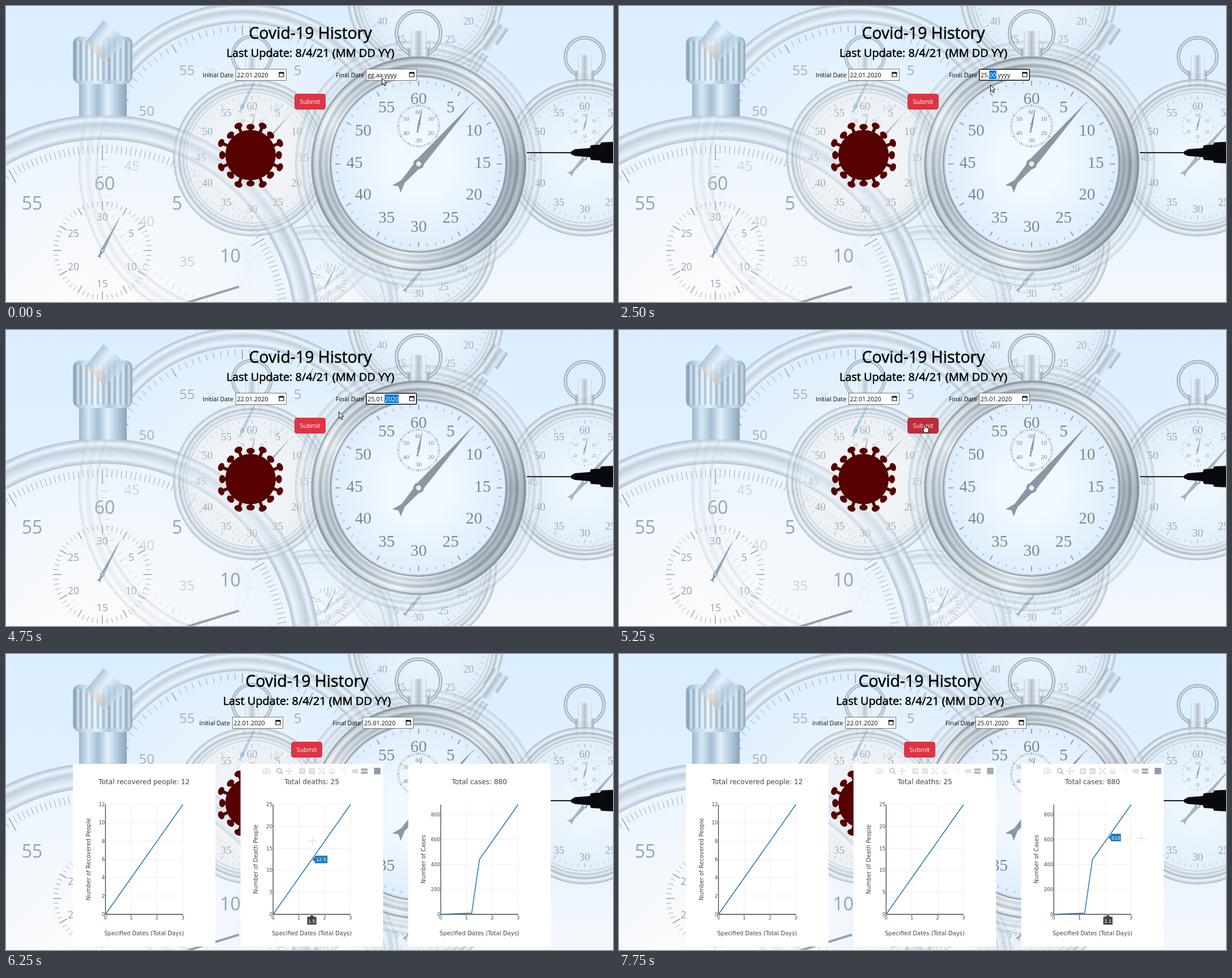
Recreate the animation shown at these times as an HTML page with a canvas. Size 1071x523 px, loop 8000 ms.

```html
<!DOCTYPE html>
<html lang="en">
<head>
<meta charset="utf-8">
<title>Covid-19 History</title>
<style>
html, body { margin: 0; width: 100%; height: 100%; overflow: hidden; }
body { position: relative; background: #e3f1fe; color: #0c0d10; font: 10.8px/16px "Open Sans", "Noto Sans", sans-serif; }
canvas, svg { position: absolute; left: 0; top: 0; }
#head { position: absolute; inset: 0; }
#head > * { position: absolute; margin: 0; white-space: nowrap; }
h1, h2 { left: 0; width: 1074px; text-align: center; font-weight: 400; color: #000; -webkit-text-stroke: .55px #000; }
h1 { top: 27px; font-size: 28.4px; line-height: 40px; }
h2 { top: 70px; font-size: 19.9px; line-height: 26px; }
.field { box-sizing: border-box; top: 111px; width: 90px; height: 21px; padding: 2px 0 0 2px; border: 1px solid #767676; background: #fff; line-height: 15px; }
.field span { display: inline-block; height: 15px; }
.field .on { background: #0078d7; color: #fff; }
.field.focus { border-color: #101010; border-radius: 2px; box-shadow: inset 0 0 0 .5px #101010; }
.field svg { left: 75px; top: 4px; }
#submit { left: 509px; top: 154.5px; width: 55px; height: 28px; border-radius: 4.5px; background: #dc3545; color: #fff; text-align: center; line-height: 28px; }
#submit.hover { background: #bb2d3b; }
.chart text { font-family: "DejaVu Sans", Verdana, sans-serif; fill: #444; }
.chart .tip text { font: 9.3px "Liberation Sans", Arial, sans-serif; fill: #fff; }
</style>
</head>
<body>
<canvas id="back" width="1071" height="523"></canvas>
<div id="head">
  <h1>Covid-19 History</h1>
  <h2>Last Update: 8/4/21 (MM DD YY)</h2>
  <span style="left:347px;top:114px">Initial Date</span>
  <div class="field" style="left:404.5px"><span>22</span>.<span>01</span>.<span>2020</span></div>
  <span style="left:582px;top:114px">Final Date</span>
  <div class="field" id="final" style="left:635px"><span></span>.<span></span>.<span></span></div>
  <div id="submit">Submit</div>
</div>
<svg id="charts" width="1071" height="523"></svg>
<svg width="1071" height="523">
  <g class="pointer" id="arrow"><path d="M.5 .5V12l2.6-2.4 2 4.6 2-.9-2-4.5h3.6z" fill="#fff" stroke="#000"/></g>
  <g class="pointer" id="hand"><path d="M3.2 1.3q1.3-1.4 2.3.2V6l4.6 1q1.6.4 1.5 2.2l-.8 4-1.2 2.4H4.3L.8 10.3q-.2-1.6 1.2-1.3l1.2 1z" fill="#fff" stroke="#000"/></g>
  <g class="pointer" id="cross"><path d="M-8 .5H9M.5-8V9" stroke="#d5dbe2"/></g>
</svg>
<script>
const $ = id => document.getElementById(id);
const g = $('back').getContext('2d');
const TAU = Math.PI * 2;

// ---- background ----
const alpha = (a, draw) => { g.save(); g.globalAlpha = a; draw(); g.restore(); };

function shade(grad, colors) {
  colors.forEach((c, i) => grad.addColorStop(i / (colors.length - 1), c));
  return grad;
}
const linear = (x0, y0, x1, y1, colors) => shade(g.createLinearGradient(x0, y0, x1, y1), colors);

function disc(x, y, r, inner, outer) {
  g.fillStyle = shade(g.createRadialGradient(x, y, r * .35, x, y, r), [inner, outer]);
  g.beginPath(); g.arc(x, y, r, 0, TAU); g.fill();
}

function annulus(x, y, r0, r1, fill) {
  g.fillStyle = fill;
  g.beginPath(); g.arc(x, y, r1, 0, TAU); g.arc(x, y, r0, 0, TAU, true); g.fill();
}

const band = (x, y, r0, r1, colors) =>
  annulus(x, y, r0, r1, shade(g.createRadialGradient(x, y, r0, x, y, r1), colors));

// light and dark patches around a polished rim
const gloss = (x, y, r0, r1) => annulus(x, y, r0, r1, shade(g.createConicGradient(0, x, y),
  ['#5d6d7b66', '#5d6d7b55', '#ffffff55', '#5d6d7b33', '#ffffff66', '#5d6d7b33', '#ffffff44', '#5d6d7b66']));

function circle(x, y, r, color, width) {
  g.strokeStyle = color; g.lineWidth = width;
  g.beginPath(); g.arc(x, y, r, 0, TAU); g.stroke();
}

function ticks(x, y, r0, r1, n, color, width = 1, every = 5, extra = 0) {
  g.strokeStyle = color;
  for (let i = 0; i < n; i++) {
    const a = i / n * TAU, s = Math.sin(a), c = -Math.cos(a), main = i % every === 0;
    const from = r0 - (main ? extra : 0);
    g.lineWidth = main ? width * 1.7 : width;
    g.beginPath(); g.moveTo(x + from * s, y + from * c); g.lineTo(x + r1 * s, y + r1 * c); g.stroke();
  }
}

function numbers(x, y, r, font, color, count = 12, step = 5, skip = []) {
  g.font = font; g.fillStyle = color; g.textAlign = 'center'; g.textBaseline = 'middle';
  for (let i = 0; i < count; i++) {
    const a = i / count * TAU, label = (i || count) * step;
    if (!skip.includes(label)) g.fillText(label, x + r * Math.sin(a), y - r * Math.cos(a) + 1);
  }
}

function needle(x, y, angle, tip, tail, width, color) {
  g.save();
  g.translate(x, y); g.rotate(angle);
  g.fillStyle = color;
  g.beginPath();
  g.moveTo(0, -tip);
  g.lineTo(width, -width); g.lineTo(width * .5, tail * .7); g.lineTo(width * 1.3, tail);
  g.lineTo(0, tail * .9);
  g.lineTo(-width * 1.3, tail); g.lineTo(-width * .5, tail * .7); g.lineTo(-width, -width);
  g.fill();
  g.beginPath(); g.arc(0, 0, width * 1.25, 0, TAU); g.fill();
  g.fillStyle = '#e6eef6';
  g.beginPath(); g.arc(0, 0, width * .6, 0, TAU); g.fill();
  g.restore();
}

const CHROME = ['#9dacb8', '#eef4f9', '#b4c1cc', '#e3ebf2', '#99a8b4', '#f2f7fb', '#cdd8e1', '#93a2af'];
const SOFT = ['#aebfce', '#eaf3fb', '#d5e3f0', '#bccddc', '#edf5fc', '#a9bccd'];

function loop(x, y, r) {
  circle(x, y, r, '#8496a5', 6);
  circle(x, y, r, '#e2edf6', 3);
  g.fillStyle = linear(x - r * .5, 0, x + r * .5, 0, ['#8496a5', '#eef5fb', '#a9b9c7', '#f4f9fd', '#8496a5']);
  g.fillRect(x - r * .48, y + r * .7, r * .96, r * .85);
  g.fillRect(x - r * .35, y - r * .1, r * .7, r * .8);
}

function pocket(x, y, face, edge) {
  band(x, y, 114, 139, CHROME);
  disc(x, y, 115, face, edge);
  ticks(x, y, 104, 109, 60, '#a0adb9', .8, 5, 2);
  numbers(x, y, 91, '19px "Liberation Serif", serif', '#85919c');
  ticks(x, y - 56, 26, 29, 30, '#909eaa', .7);
  numbers(x, y - 56, 19, '8px "Liberation Serif", serif', '#808d99', 6, 10);
  needle(x, y - 56, .25, 24, 8, 1.4, '#808e9b');
  needle(x, y, .72, 104, 42, 4, '#98a5b0');
}

function pusher(x, y, angle, w, h) {
  g.save();
  g.translate(x, y); g.rotate(angle);
  g.fillStyle = linear(-w / 2, 0, w / 2, 0, ['#8fa0af', '#eaf3fa', '#a3b4c2', '#dde9f3', '#8798a7']);
  g.fillRect(-w / 2, -h / 2, w, h);
  g.fillRect(-w * .3, h / 2, w * .6, h * .6);
  g.restore();
}

function crown() {
  g.fillStyle = linear(129, 0, 213, 0, ['#9db6ca', '#d5e8f6', '#a5bfd3', '#e3f0fa', '#b3cadc', '#8aa4ba']);
  g.fillRect(129, 125, 84, 70);
  g.fillStyle = linear(118, 0, 223, 0, ['#94aec3', '#c9dfef', '#e1eff9', '#b3cbde', '#cbe0ef', '#93adc2']);
  g.beginPath(); g.roundRect(118, 54, 105, 84, [12, 12, 14, 14]); g.fill();
  for (let x = 122; x < 222; x += 5) {
    g.strokeStyle = x % 2 ? 'rgba(255,255,255,.35)' : 'rgba(100,130,155,.3)';
    g.beginPath(); g.moveTo(x, 62); g.lineTo(x, 132); g.stroke();
  }
  alpha(.75, () => {
    g.fillStyle = linear(142, 30, 205, 78, ['#cfe3f3', '#a0b8cc', '#e6f2fb', '#b5ccdf', '#d5e6f3']);
    g.beginPath(); g.moveTo(172, 25); g.lineTo(208, 56); g.lineTo(208, 70); g.lineTo(172, 98); g.lineTo(142, 62); g.fill();
  });
  alpha(.3, () => {
    g.fillStyle = '#eab999';
    g.beginPath(); g.moveTo(136, 65); g.lineTo(183, 104); g.lineTo(170, 72); g.fill();
  });
}

function virus(x, y) {
  g.fillStyle = g.strokeStyle = '#560000';
  g.beginPath(); g.arc(x, y, 44.5, 0, TAU); g.fill();
  for (let i = 0; i < 16; i++) {
    const r = i % 2 ? 56 : 50;
    g.save();
    g.translate(x, y); g.rotate(i / 16 * TAU);
    g.lineWidth = 5.5;
    g.beginPath(); g.moveTo(0, -40); g.lineTo(0, -r); g.stroke();
    g.beginPath(); g.ellipse(0, -r, 7.3, 5.3, 0, 0, TAU); g.fill();
    g.restore();
  }
}

function syringe() {
  g.fillStyle = '#090a0d';
  g.beginPath(); g.moveTo(919, 258.3); g.lineTo(1000, 258.3); g.lineTo(1000, 260.3); g.lineTo(919, 260); g.fill();
  g.beginPath();
  g.moveTo(997, 257); g.lineTo(1004, 253); g.lineTo(1030, 251); g.lineTo(1032, 246); g.lineTo(1048, 245);
  g.lineTo(1050, 241); g.lineTo(1071, 240); g.lineTo(1071, 278); g.lineTo(1050, 277); g.lineTo(1048, 273);
  g.lineTo(1032, 272); g.lineTo(1030, 267); g.lineTo(1004, 265); g.lineTo(997, 262); g.fill();
}

function backdrop() {
  const sans = '24px "Open Sans", sans-serif', faint = '#a3b1be';
  g.fillStyle = linear(0, 0, 0, 523, ['#dbeeff', '#e0f0ff', '#e8f3fe', '#f4f8fd']);
  g.fillRect(0, 0, 1071, 523);

  // second large dial
  alpha(.85, () => {
    disc(417, 284, 256, '#f0f6fc', '#deeffe');
    band(417, 284, 254, 289, SOFT);
    ticks(417, 284, 238, 249, 120, '#8192a2', .9, 10, 6);
  });
  numbers(417, 284, 195, sans, faint, 12, 5, [60, 10, 15, 20, 25, 30, 40, 45]);

  // watches above and below the main one
  alpha(.7, () => {
    for (const [x, y] of [[740, -17], [728, 420]]) {
      band(x, y, 112, 138, CHROME);
      disc(x, y, 113, '#eef5fc', '#dfedf9');
      ticks(x, y, 103, 108, 60, '#8f9eab', .8, 5, 2);
      numbers(x, y, 88, '18px "Liberation Serif", serif', '#8493a0');
    }
    ticks(716, 488, 17, 20, 30, '#8899a8', .7);
    needle(716, 488, .7, 60, 22, 3, '#8796a3');
    pusher(864, 47, .6, 30, 34);
    pusher(832, 98, .6, 20, 36);
  });

  // lower middle dial
  alpha(.7, () => {
    band(545, 535, 122, 148, SOFT);
    disc(545, 535, 123, '#f8fbfe', '#e6f0f9');
    pusher(412, 436, -.7, 30, 28);
    ticks(568, 488, 26, 34, 30, '#8d9cab', .9);
    numbers(568, 488, 20, '9px "Open Sans", sans-serif', '#8797a6', 6, 5);
    needle(568, 488, .45, 36, 14, 1.6, '#8fa4b6');
  });

  // large left dial
  alpha(.88, () => {
    disc(170, 576, 342, '#fbfbfc', '#ecf5fd');
    band(170, 576, 340, 384, SOFT);
  });
  ticks(170, 576, 316, 330, 240, '#8794a0', .8, 20, 12);
  numbers(174, 572, 256, '32px "Open Sans", sans-serif', '#96a3b0');
  ticks(170, 432, 78, 87, 60, '#93a0ac', .9, 5, 6);
  numbers(170, 432, 59, '17.5px "Open Sans", sans-serif', '#95a3b0', 6, 5);
  needle(170, 432, .48, 72, 14, 3, '#7f9ab0');
  alpha(.5, () => {
    numbers(417, 284, 195, sans, faint, 12, 5, [60, 55, 50, 5, 10, 15, 20, 25, 30]);
    band(417, 284, 255, 289, ['#a9b9c8aa', '#ffffff55', '#b9c9d666', '#ffffff55', '#a9b9c8aa']);
    ticks(417, 284, 240, 250, 120, '#a9b7c4', .8);
  });
  g.strokeStyle = '#95a2ad'; g.lineWidth = 4;
  g.beginPath(); g.moveTo(320, 524); g.lineTo(411, 496); g.stroke();
  crown();

  // small pocket watches
  alpha(.7, () => { loop(434, 88, 34); pocket(434, 268, '#f4f3f4', '#ebeff3'); });
  alpha(.35, () => {
    band(170, 576, 340, 384, SOFT);
    numbers(417, 150, 64, '17px "Open Sans", sans-serif', '#6fa6d0', 6, 5, [30, 15, 20]);
    needle(417, 178, .45, 70, 12, 3, '#4f8fc0');
  });
  alpha(.8, () => { loop(1021, 90, 34); pocket(1021, 268, '#eff6fd', '#dfeefb'); });

  // main watch
  alpha(.4, () => band(728, 279, 186, 218, CHROME));
  alpha(.85, () => loop(728, 48, 39));
  band(728, 279, 152, 190, CHROME);
  gloss(728, 279, 152, 190);
  circle(728, 279, 187, '#83929f', 1.5);
  circle(728, 279, 156, '#8d9ca9', 2);
  disc(728, 279, 153, '#f1f8ff', '#deeefd');
  ticks(728, 279, 142, 147, 60, '#8a97a3', 1, 5, 4);
  numbers(728, 277, 113, '29px "Liberation Serif", serif', '#7c8995');
  ticks(728, 212, 34, 38, 60, '#8794a0', .9);
  numbers(728, 212, 25, '11px "Liberation Serif", serif', '#77848f', 6, 10);
  needle(728, 212, .2, 34, 12, 2, '#85929e');
  needle(728, 279, .724, 148, 59, 7.5, '#8b98a3');

  virus(431.5, 263.5);
  syringe();
}

// ---- charts ----
const chartTop = 266, chartBase = 460, unit = 45.5;
const text = (x, y, size, str, anchor = 'middle', more = '') =>
  `<text x="${x}" y="${y}" font-size="${size}" text-anchor="${anchor}" ${more}>${str}</text>`;

const ICONS = [
  'M158 204h3l1-2h4l1 2h3v7h-12zM162 207.5a2 2 0 1 0 4 0a2 2 0 1 0-4 0',
  'M182 206a4 4 0 1 0 8 0a4 4 0 1 0-8 0M189 209l3.5 3.5',
  'M204 201.5v11M198.5 207h11M202.5 203l1.5-1.5 1.5 1.5M202.5 211l1.5 1.5 1.5-1.5M200 205.5l-1.5 1.5 1.5 1.5M208 205.5l1.5 1.5-1.5 1.5',
  'M222.5 202.5h9v9h-9zM227 204.5v5M224.5 207h5',
  'M239.5 202.5h9v9h-9zM241.5 207h5',
  'M256.5 205v-3h3M263.5 202h3v3M266.5 209v3h-3M259.5 212h-3v-3M258 203.5l7 7M265 203.5l-7 7',
  'M273.5 207.5l5.5-4.5 5.5 4.5M275.5 207v4.5h2.5v-3h2v3h2.5V207',
  'M296 204h2M299.5 204h2M303.5 203v2M303.5 207v2M303.5 210.5v1',
  'M314 207l3-3h8v6h-8z',
  'M331.5 203h10v2.5h-10zM331.5 208.5h10v2.5h-10z'
];
const SOLID = [3, 4, 8, 9], DARK = [1, 9];

function toolbar() {
  const icons = ICONS.map((d, i) => {
    const color = DARK.includes(i) ? '#72747a' : '#c4c6ca';
    const solid = SOLID.includes(i);
    const sign = i === 3 || i === 4 ? `<path d="${d.slice(d.indexOf('z') + 1)}" stroke="#fff" stroke-width="1.3"/>` : '';
    return `<path d="${d}" fill="${solid ? color : 'none'}" stroke="${color}" stroke-width="1.5"/>${sign}`;
  });
  return `<g class="bar">${icons.join('')}<rect x="353.5" y="201" width="11.5" height="11.5" fill="#46587e"/></g>`;
}

const specs = [
  { title: 'Total recovered people: 12', axis: 'Number of Recovered People', max: 12, step: 2, data: [[0, 0], [3, 12]] },
  { title: 'Total deaths: 25', axis: 'Number of Death People', max: 25, step: 5, data: [[0, 0], [3, 25]] },
  { title: 'Total cases: 880', axis: 'Number of Cases', max: 880, step: 200, data: [[0, 0], [1.2, 10], [1.5, 440], [3, 880]] }
];
const px = x => 175.5 + x * unit;
const py = (v, max) => chartBase - v / max * (chartBase - chartTop);

function chart(spec, i) {
  let grid = '', labels = '';
  for (let x = 0; x <= 3; x++) {
    if (x) grid += `M${px(x)} ${chartTop}V${chartBase}`;
    labels += text(px(x), 468.5, 8.6, x);
  }
  for (let v = 0; v <= spec.max; v += spec.step) {
    const y = py(v, spec.max);
    if (v) grid += `M175.5 ${y}H312`;
    labels += text(174.5, y + 3, 8.6, v, 'end');
  }
  const line = spec.data.map(([x, v]) => `${px(x)},${py(v, spec.max)}`).join(' ');
  return `<g class="chart" transform="translate(${i * 295.8})">
    <rect x="118" y="194" width="251.5" height="323" fill="#fff"/>
    <path d="${grid}" stroke="#eee" fill="none"/>
    <path d="M175.5 ${chartTop}V${chartBase}H312" stroke="#444" stroke-width="1.3" fill="none"/>
    <polyline points="${line}" fill="none" stroke="#1f77b4" stroke-width="1.5"/>
    ${labels}${text(243.8, 229.5, 12.1, spec.title)}${text(243.8, 497, 10, 'Specified Dates (Total Days)')}
    ${text(0, 0, 10, spec.axis, 'middle', 'transform="translate(148.5 362.5) rotate(-90)"')}
    ${toolbar()}<g class="tip"></g></g>`;
}

function valueAt(data, x) {
  const k = data.findIndex(p => p[0] >= x), [x1, v1] = data[k], [x0, v0] = data[Math.max(0, k - 1)];
  return x1 === x0 ? v1 : v0 + (v1 - v0) * (x - x0) / (x1 - x0);
}

function tip(spec, x) {
  const v = +valueAt(spec.data, x).toFixed(2), X = px(x), Y = py(v, spec.max);
  const w = String(v).length * 4.6 + 4.5;
  return `<path d="M${X} ${Y}l5-4v-3h${w}v14h-${w}v-3z" fill="#1f77b4" stroke="#fff" stroke-width=".7"/>
    ${text(X + 5 + w / 2, Y + 3.3, 9.3, v)}
    <path d="M${X} 460l4 4h4.5v14.5h-17v-14.5h4.5z" fill="#444" stroke="#fff" stroke-width=".7"/>
    ${text(X, 474.5, 9.3, x)}`;
}

// ---- timeline: every entry holds until the next ----
const entries = [
  [0, 'gg.aa.yyyy', -1], [750, 'gg.aa.yyyy', 0], [2000, '02.aa.yyyy', 0], [2250, '25.aa.yyyy', 1],
  [2500, '25.00.yyyy', 1], [2750, '25.01.yyyy', 2], [3250, '25.01.0002', 2], [3500, '25.01.0020', 2],
  [3750, '25.01.0202', 2], [4250, '25.01.2020', 2], [5250, '25.01.2020', -1]
];
const pointers = [
  [0, 'arrow', 663, 127], [250, 'arrow', 649, 120], [500, 'arrow', 646, 126], [750, 'arrow', 645, 123],
  [1000, 'arrow', 655, 139], [4750, 'arrow', 587, 144], [5000, 'hand', 521, 167], [5250, 'hand', 535, 166],
  [6000, 'arrow', 538, 184], [6250, 'cross', 540, 330], [6500, 'cross', 266, 350], [6750, 'cross', 219, 360],
  [7000, 'arrow', 314, 384], [7250, 'cross', 500, 345], [7500, 'cross', 582, 335], [7750, 'cross', 921, 325]
];
// hovered chart, day under the pointer, toolbar opacities
const hovers = [
  [0, -1, 0, [0, 0, 0]], [6250, 1, 1.5, [0, .6, 0]], [6500, 0, 1.8, [.6, .5, 0]], [6750, 0, .9, [1, 0, 0]],
  [7000, 0, 2.4, [1, 0, 0]], [7250, 1, .6, [.5, .6, 0]], [7500, 1, 2.4, [0, 1, 0]], [7750, 2, 2.1, [0, .5, .6]]
];
const at = (list, t) => list.findLast(e => e[0] <= t);

const final = $('final'), parts = final.querySelectorAll('span');
const calendar = `<svg width="10" height="10"><path d="M1 2h8v7H1z" fill="none" stroke="#111" stroke-width="1.2"/><path d="M.5 1h9v2.5h-9zM2 0h1.5v2H2zM6.5 0H8v2H6.5z" fill="#111"/></svg>`;
document.querySelectorAll('.field').forEach(f => f.insertAdjacentHTML('beforeend', calendar));
$('charts').innerHTML = specs.map(chart).join('');
const bars = document.querySelectorAll('.bar'), tips = document.querySelectorAll('.tip');
const pointerNodes = document.querySelectorAll('.pointer');

function render(t) {
  const shown = t >= 5500;
  const [, date, active] = at(entries, t);
  date.split('.').forEach((s, i) => {
    parts[i].textContent = s;
    parts[i].className = i === active ? 'on' : '';
  });
  final.classList.toggle('focus', active >= 0);
  $('submit').classList.toggle('hover', t >= 5000 && t < 6250);
  $('head').style.left = shown ? '-6px' : '0';
  $('charts').style.display = shown ? '' : 'none';

  const [, hovered, day, opacity] = at(hovers, t);
  specs.forEach((spec, i) => {
    bars[i].setAttribute('opacity', opacity[i]);
    tips[i].innerHTML = i === hovered ? tip(spec, day) : '';
  });

  const [, kind, x, y] = at(pointers, t);
  pointerNodes.forEach(n => {
    n.style.display = n.id === kind ? '' : 'none';
    n.setAttribute('transform', `translate(${x} ${y})`);
  });
}

backdrop();
const start = performance.now();
function frame(now) {
  render(Math.max(0, now - start) % 8000);
  requestAnimationFrame(frame);
}
render(0);
requestAnimationFrame(frame);
</script>
</body>
</html>
```
